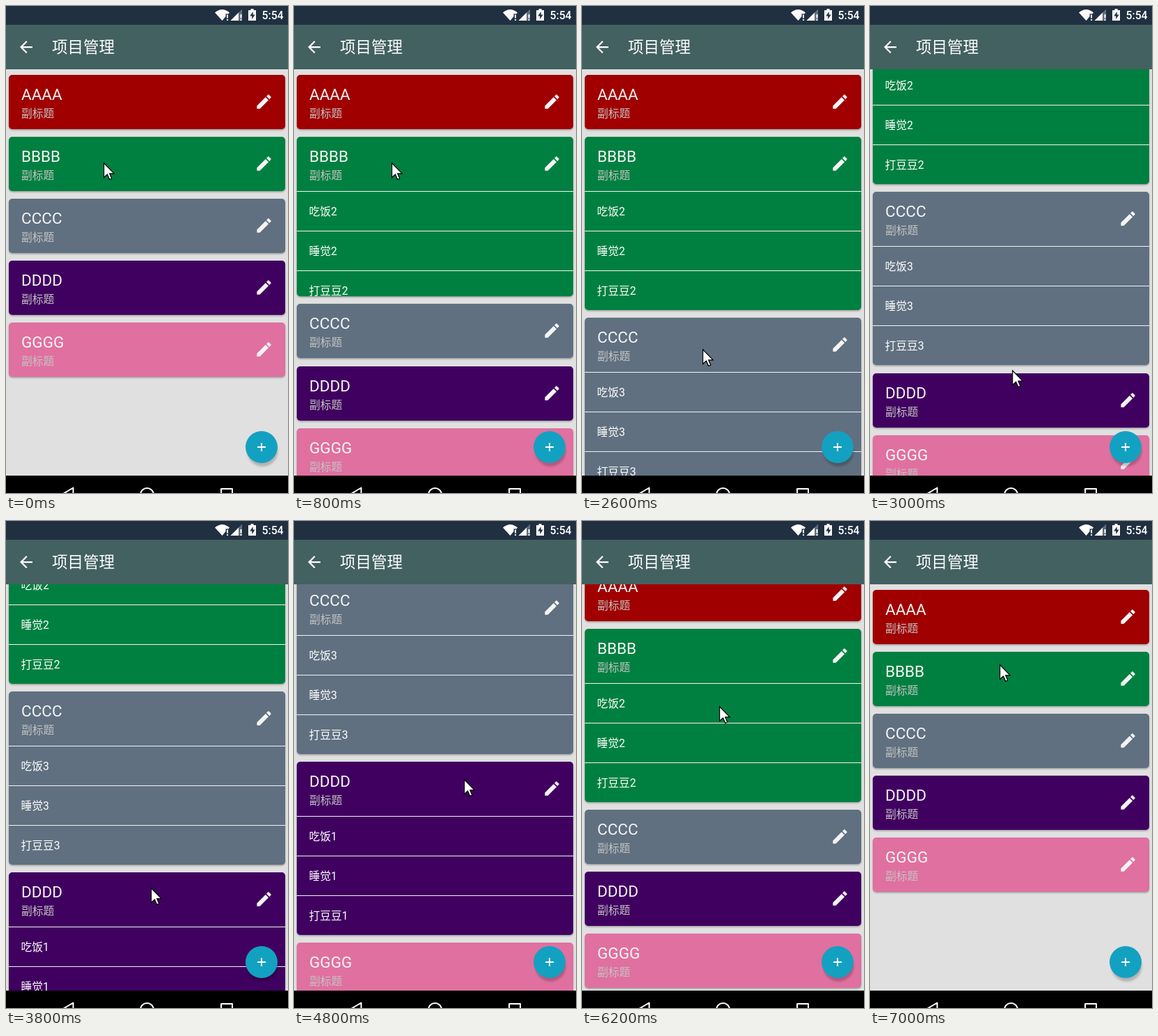
Write an HTML page that moves like this. It is 405x700 px and loops after 8600 ms.

```html
<!DOCTYPE html>
<html lang="zh-CN">
<head>
<meta charset="utf-8">
<title>项目管理</title>
<style>
  html, body { margin: 0; width: 100%; height: 100%; overflow: hidden; background: #e0e0e0; }
  svg { display: block; }
  text { font-family: Roboto, "Noto Sans CJK SC", "Noto Sans CJK", sans-serif; fill: #fff; }
  .name { font-size: 22.5px; fill: #f5f5f5; }
  .sub { font-size: 15.75px; fill: #c3c3c3; }
  .row { font-size: 15.75px; }
  .soft { filter: blur(1.6px); }
  .edge { filter: blur(.8px); }
</style>
</head>
<body>
<svg width="405" height="700" viewBox="0 0 405 700">
  <rect width="405" height="700" fill="#e0e0e0"/>
  <svg y="91" width="405" height="584" viewBox="0 91 405 584"><g id="list"></g></svg>

  <rect width="405" height="27" fill="#203041"/>
  <rect y="27" width="405" height="64" fill="#426160"/>
  <g fill="#fff">
    <path d="M300 9.5Q310.500 0.500 321 9.500L319.500 11.200H315.500V15L310.500 21Z"/>
    <path d="M317 12.500h2v5h-2zM317 19h2v2h-2z"/>
    <path d="M322.500 21L339 4.500V21Z" opacity=".3"/>
    <path d="M322.500 21L334 9.500V21Z"/>
    <path d="M336.500 12h2v5.500h-2zM336.500 19h2v2h-2z"/>
    <path d="M351.500 4h4v2h3.500v15h-11V6h3.500z"/>
    <path d="M354.700 8l-4.500 6.500h3v4.500l4.500-6.500h-3z" fill="#203041"/>
    <path transform="translate(15.500 45.500) scale(1.125)" d="M20 11H7.830l5.590-5.590L12 4l-8 8 8 8 1.410-1.410L7.830 13H20z"/>
  </g>
  <text x="367.500" y="19" font-size="15.75" font-weight="500">5:54</text>
  <text x="66" y="67" font-size="22.5">项目管理</text>

  <circle class="soft" cx="368.500" cy="640" r="22" opacity=".2"/>
  <circle cx="367" cy="634" r="23" fill="#13a1c1"/>
  <path d="M361 634h12M367 628v12" stroke="#fff" stroke-width="2"/>

  <rect y="675" width="405" height="25"/>
  <g fill="none" stroke="#fff" stroke-width="2" stroke-linejoin="round">
    <path d="M96.500 692.500V712L80.500 702Z"/>
    <circle cx="202.500" cy="702.500" r="9.500"/>
    <rect x="309" y="694" width="16" height="16"/>
  </g>
  <path id="cursor" d="M0 0V17L4 13.300 6.600 19.300 9.200 18.200 6.700 12.300H12Z" fill="#fff" stroke="#000"/>
</svg>
<script>
const LOOP = 8600, STEP = 200;
const TOP = 99, PITCH = 89.1, WIDTH = 397, HEAD = 78, ROW = 57, END = 671.1;
const PEN = 'M3 17.25V21h3.75L17.81 9.94l-3.75-3.75zM20.71 7.04c.39-.39.39-1.02 0-1.41l-2.34-2.34c-.39-.39-1.02-.39-1.41 0l-1.83 1.83 3.75 3.75z';
const TASKS = ['吃饭', '睡觉', '打豆豆'];

// opened and closed are the moments of the taps, in ms
const cards = [
  { name: 'AAAA', color: '#a00000' },
  { name: 'BBBB', color: '#008040', tag: 2, opened: 600, closed: 6800 },
  { name: 'CCCC', color: '#607080', tag: 3, opened: 2000, closed: 6000 },
  { name: 'DDDD', color: '#400060', tag: 1, opened: 3200, closed: 5000 },
  { name: 'GGGG', color: '#e070a0' }
];

// Pointer moves: start, end, x, y
const home = { x: 140, y: 225 };
const moves = [
  [1200, 1800, 126, 467],
  [2400, 2600, 173, 493],
  [2600, 3200, 208, 527],
  [3800, 4400, 244, 530],
  [4400, 4800, 244, 371],
  [5200, 5800, 197, 266],
  [6200, 6800, 186, 206]
];

// Decelerating progress from 0 to 1
function ease(t, from, to, power = 2) {
  const p = Math.min(1, Math.max(0, (t - from) / (to - from)));
  return 1 - (1 - p) ** power;
}

function openHeight(card, t) {
  if (!card.tag) return 0;
  const shown = ease(t, card.opened, card.opened + 390, 3) - ease(t, card.closed, card.closed + STEP);
  return ROW * TASKS.length * shown;
}

const scrollAt = t => 203.3 * ease(t, 2600, 3200) + 159 * ease(t, 4400, 4800);

function pointerAt(t) {
  return moves.reduce((pos, [from, to, x, y]) => {
    const k = ease(t, from, to);
    return { x: pos.x + (x - pos.x) * k, y: pos.y + (y - pos.y) * k };
  }, home);
}

const rowMarkup = (label, i) =>
  `<rect y="${i * ROW}" width="${WIDTH}" height="1" fill="#f4f4f4"/>
   <text class="row" x="17.500" y="${i * ROW + 35}">${label}</text>`;

const cardMarkup = c => `<g>
  <rect class="edge" y="1.500" width="${WIDTH}" rx="5" opacity=".3"/>
  <rect width="${WIDTH}" rx="5" fill="${c.color}"/>
  <text class="name" x="18" y="35.500">${c.name}</text>
  <text class="sub" x="18" y="61.300">副标题</text>
  <path transform="translate(353 25) scale(1.125)" d="${PEN}" fill="#f5f5f5"/>
  <svg y="${HEAD}" width="${WIDTH}" height="0">${
    c.tag ? TASKS.map((s, i) => rowMarkup(s + c.tag, i)).join('') : ''
  }</svg></g>`;

const list = document.getElementById('list');
const cursor = document.getElementById('cursor');
list.innerHTML = cards.map(cardMarkup).join('');
cards.forEach((c, i) => {
  c.el = list.children[i];
  c.boxes = c.el.querySelectorAll('rect[rx]');
  c.rows = c.el.querySelector('svg');
});

function draw(t) {
  const heights = cards.map(c => openHeight(c, t));
  const extra = heights.reduce((a, b) => a + b);
  const limit = Math.max(0, TOP + (cards.length - 1) * PITCH + HEAD + extra - END);
  let y = TOP - Math.min(scrollAt(t), limit);
  cards.forEach((c, i) => {
    const h = heights[i];
    c.el.setAttribute('transform', `translate(4 ${Math.round(y)})`);
    c.boxes.forEach(b => b.setAttribute('height', HEAD + h));
    c.rows.setAttribute('height', h);
    y += PITCH + h;
  });
  const p = pointerAt(t);
  cursor.setAttribute('transform', `translate(${p.x + .6} ${p.y + .8}) scale(1.22)`);
}

const start = performance.now();
function tick() {
  const t = (performance.now() - start) % LOOP;
  draw(Math.floor(t / STEP) * STEP);
  requestAnimationFrame(tick);
}
tick();
</script>
</body>
</html>
```
